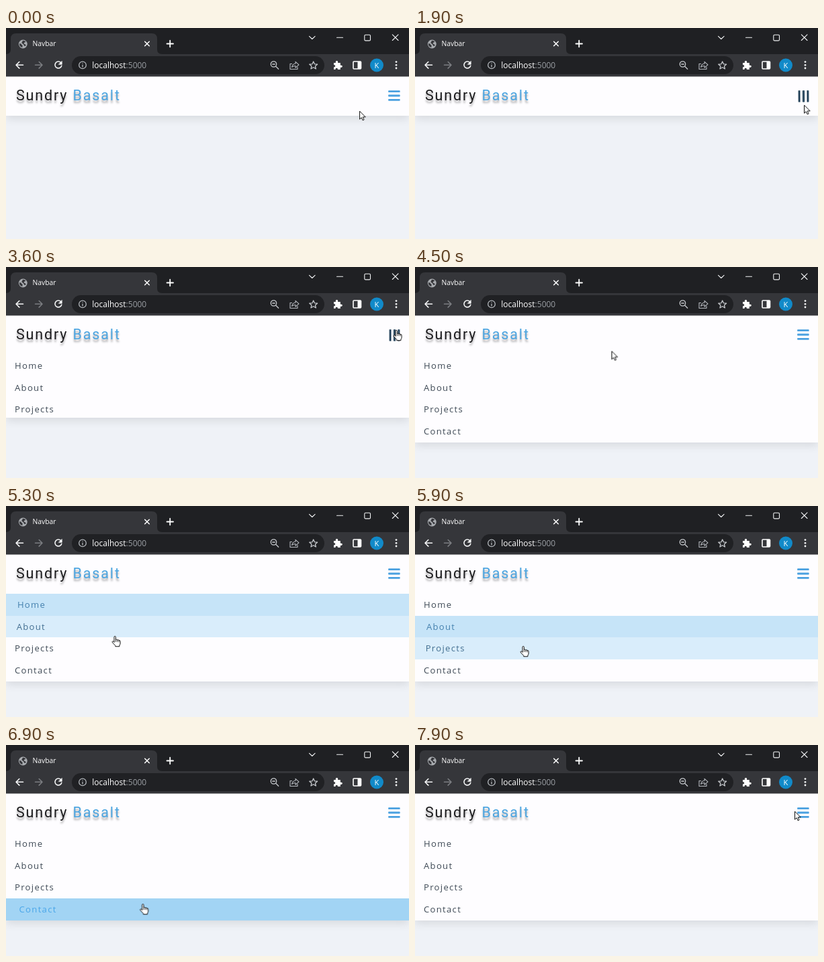
Animation of 600 by 315 pixels, one loop 8000 ms. Source, as an HTML page:

```html
<!DOCTYPE html>
<html lang="en">
<head>
<meta charset="utf-8">
<title>Navbar</title>
<style>
@property --h { syntax: "<number>"; inherits: false; initial-value: 0; }

html, body { margin: 0; width: 100%; height: 100%; overflow: hidden; background: #eff2f7; }
#stage { position: relative; width: 600px; height: 315px; overflow: hidden; background: #eff2f7; }
#chrome { position: absolute; left: 0; top: 0; font-family: "Open Sans", "Noto Sans", sans-serif; font-weight: 500; }

nav {
  position: absolute; left: 0; top: 72px; width: 600px;
  background: #fefdff; box-shadow: 0 4px 13px rgba(0, 0, 0, .11);
}
header { height: 59px; position: relative; }
.logo {
  position: absolute; left: 15px; top: 13px; white-space: nowrap;
  font: 21.5px/32px Roboto, Arial, sans-serif; letter-spacing: 1.85px;
  color: #1c1c1e; text-shadow: 0 4px 3px rgba(0, 0, 0, .32);
}
.logo b { font-weight: 400; color: #4da5e0; }
.toggle {
  position: absolute; left: 568px; top: 18.5px; width: 20px; height: 20px;
  color: #49a0e0; fill: currentColor; overflow: visible;
  transform-origin: 9.75px 10.75px;
  animation: toggle 8s linear infinite;
}
@keyframes toggle {
  0%, 8.75%, 27.5%, 30%, 53.125%, 100% { transform: rotate(0); color: #49a0e0; }
  12.5%, 23.75%, 33.75%, 49.375% { transform: rotate(90deg); color: #16364f; }
}

.links {
  margin: 0; padding: 0; list-style: none; height: 0; overflow: hidden;
  animation: open 8s linear infinite;
}
@keyframes open {
  0%, 42.3125% { height: 0; }
  46.0625%, 100% { height: 130.8px; }
}
.links li {
  height: 32.7px; padding-left: calc(13px + 6.54px * var(--h));
  font: 13.08px/32.7px "Open Sans", "Noto Sans", sans-serif; letter-spacing: 1.31px;
  color: color-mix(in srgb, #49a6e9 calc(var(--h) * 100%), #3f4a56);
  background: rgb(162 212 244 / var(--h));
  animation: 8s linear infinite;
}
.links li:nth-child(1) { animation-name: home; }
.links li:nth-child(2) { animation-name: about; }
.links li:nth-child(3) { animation-name: projects; }
.links li:nth-child(4) { animation-name: contact; }
@keyframes home { 58.75%, 68.5% { --h: 0; } 62.5%, 64.75% { --h: 1; } }
@keyframes about { 64.75%, 76% { --h: 0; } 68.5%, 72.25% { --h: 1; } }
@keyframes projects { 72.25%, 83.125% { --h: 0; } 76%, 79.375% { --h: 1; } }
@keyframes contact { 79.375%, 91.375% { --h: 0; } 83.125%, 87.625% { --h: 1; } }

#cursor {
  position: absolute; left: 0; top: 0; width: 20px; height: 20px; overflow: visible;
  fill: #fff; stroke: #111; stroke-linejoin: round; stroke-linecap: round;
  animation: move 8s linear infinite;
}
@keyframes move {
  0% { transform: translate(526px, 124px); }
  4% { transform: translate(546px, 120px); }
  8.75% { transform: translate(582px, 97px); }
  10%, 15% { transform: translate(581px, 95px); }
  20%, 22.6% { transform: translate(581px, 94px); }
  23.75% { transform: translate(579px, 115px); }
  26% { transform: translate(583px, 126px); }
  28% { transform: translate(584px, 120px); }
  30% { transform: translate(582px, 103px); }
  31.5%, 49% { transform: translate(581px, 94px); }
  49.6% { transform: translate(572px, 116px); }
  52% { transform: translate(480px, 123px); }
  57% { transform: translate(260px, 126px); }
  58.75% { transform: translate(192px, 132px); }
  61% { transform: translate(165px, 147px); }
  63% { transform: translate(162px, 153px); }
  64.75% { transform: translate(162px, 166px); }
  66.25% { transform: translate(162px, 194px); }
  67.5%, 71.3% { transform: translate(162px, 198px); }
  72.25% { transform: translate(161px, 200px); }
  73.75% { transform: translate(161px, 209px); }
  76% { transform: translate(161px, 217px); }
  79.375% { transform: translate(161px, 231px); }
  81.25% { transform: translate(161px, 241px); }
  84% { transform: translate(162px, 243px); }
  86% { transform: translate(185px, 240px); }
  87.625% { transform: translate(300px, 222px); }
  88.75% { transform: translate(400px, 130px); }
  91.25% { transform: translate(510px, 112px); }
  95% { transform: translate(555px, 102px); }
  98.75%, 100% { transform: translate(565px, 99px); }
}
.arrow { animation: arrow 8s step-end infinite; }
.hand { animation: hand 8s step-end infinite; }
@keyframes arrow {
  0%, 22.8%, 49.4%, 88.6%, 100% { opacity: 1; }
  8.5%, 30.1%, 58.75% { opacity: 0; }
}
@keyframes hand {
  0%, 22.8%, 49.4%, 88.6%, 100% { opacity: 0; }
  8.5%, 30.1%, 58.75% { opacity: 1; }
}
</style>
</head>
<body>
<div id="stage">
  <nav>
    <header>
      <div class="logo">Sundry <b>Basalt</b></div>
      <svg class="toggle" viewBox="0 0 20 20">
        <rect x="1.2" y="2.3" width="17.4" height="2.8" rx=".6"/>
        <rect x="1.2" y="8.6" width="17.4" height="2.8" rx=".6"/>
        <rect x="1.2" y="14.9" width="17.4" height="2.8" rx=".6"/>
      </svg>
    </header>
    <ul class="links">
      <li>Home</li>
      <li>About</li>
      <li>Projects</li>
      <li>Contact</li>
    </ul>
  </nav>

  <svg id="chrome" width="600" height="73" fill="none" stroke-linecap="round" stroke-linejoin="round">
    <path fill="#1f2023" d="M0 0h600v40H0z"/>
    <path fill="#35363a" d="M0 39h600v33.5H0z"/>
    <path fill="#35363a" d="M0 39q7 0 7-7V16q0-8 8-8h202q8 0 8 8v16q0 7 7 7z"/>
    <rect x="98" y="42" width="376" height="27" rx="13.5" fill="#202124"/>

    <!-- tab -->
    <circle cx="25.3" cy="24" r="6.4" fill="#a9acb0"/>
    <path fill="#35363a" d="M20.5 22.5l4 3.2v3.4q-4-1-4.6-4.6zM25 18.8q3-.2 4.5 2l-2.300 1-.5 2 2.500.6.300 1.800q-1.500 1.500-2.400.4l-1.400-2.600-2.500-1.400z"/>
    <text x="39.5" y="27.3" font-size="10.3" fill="#fff">Navbar</text>
    <g stroke="#fff" stroke-width="1.5">
      <path d="M206.700 20.200l6.600 6.600m0-6.600l-6.600 6.600"/>
      <path stroke-width="1.8" d="M239.500 23.500h9.500m-4.750-4.750v9.500"/>
    </g>

    <!-- window buttons -->
    <g stroke="#f1f2f4" stroke-width="1.1">
      <path d="M451.500 12.300l4.300 4.200 4.300-4.200"/>
      <path d="M492.500 14.200h9"/>
      <rect x="533.800" y="10.200" width="8.700" height="8.700" rx="1.500"/>
      <path d="M575.300 9.800l8.700 8.700m0-8.700l-8.700 8.700"/>
    </g>

    <!-- toolbar -->
    <g stroke="#f5f6f7" stroke-width="1.6">
      <path d="M25.500 55.300H15m4.800-4.800L15 55.300l4.800 4.800"/>
      <path stroke="#7b7d81" d="M43.500 55.300H54m-4.800-4.800l4.800 4.800-4.800 4.800"/>
      <path d="M81.500 51.500a5 5 0 1 0 1.300 4.800"/>
      <path fill="#f5f6f7" stroke-width=".8" d="M83.200 49.800v4.500h-4.500z"/>
    </g>
    <g stroke="#b5b9be" stroke-width="1.3">
      <circle cx="114" cy="55.400" r="5.300"/>
      <path d="M114 55.200v2.800m0-5.300v.1"/>
    </g>
    <text x="128.300" y="59.700" font-size="12" fill="#fff">localhost<tspan font-weight="400" fill="#9a9ea3">:5000</tspan></text>
    <g stroke="#c6c9cd" stroke-width="1.3">
      <circle cx="398.500" cy="54" r="4.200"/>
      <path d="M401.700 57.200l4 4M396.700 54h3.600"/>
      <path stroke="#b5b9be" stroke-width="1.1" d="M425.500 53.500H423v8h11v-3M425.700 58.300q.8-4.800 5.300-5v-3l5 4.500-5 4.500v-2.800q-3.300 0-5.300 1.800z"/>
      <path d="M457.700 50l1.700 3.800 4.200.4-3.200 2.700 1 4.100-3.700-2.200-3.700 2.200 1-4.100-3.200-2.700 4.200-.4z"/>
    </g>
    <path fill="#fff" d="M488 52h3q-.8-3 1.500-3t1.500 3h3.800v3.500q3 0 3 1.800t-3 1.800V62H494q0-2.300-1.800-2.300T490.500 62H488v-3.500q2.300 0 2.300-1.700T488 55z"/>
    <rect x="517" y="50" width="11.500" height="11" rx="1" stroke="#fff" stroke-width="1.6"/>
    <path fill="#fff" d="M523.500 50h5v11h-5z"/>
    <circle cx="552" cy="55.500" r="10" fill="#118ac9"/>
    <text x="552" y="59.500" font-size="11" fill="#fff" text-anchor="middle">K</text>
    <g fill="#f5f6f7">
      <circle cx="581" cy="50.600" r="1.400"/><circle cx="581" cy="55.300" r="1.400"/><circle cx="581" cy="60" r="1.400"/>
    </g>
  </svg>

  <svg id="cursor">
    <path class="arrow" d="M.5.5v11.700l2.700-2.500 1.900 4.100 1.900-.8-1.800-4.100h3.600z"/>
    <g class="hand">
      <path d="M-1 9V1.600Q-1 .4.200.4t1.200 1.200v4Q2.600 4.600 3.800 6q1.400-.8 2.300.5 2-.4 2 1.700V11q0 1.500-1.200 3v1.700H.8v-1.300L-3.500 9.800q-.9-1.300.2-1.900t2.300 1.100z"/>
      <path fill="none" stroke-width=".8" d="M1.400 5.600v3M3.800 6v2.700M6.100 6.500v2.400"/>
    </g>
  </svg>
</div>
</body>
</html>
```
